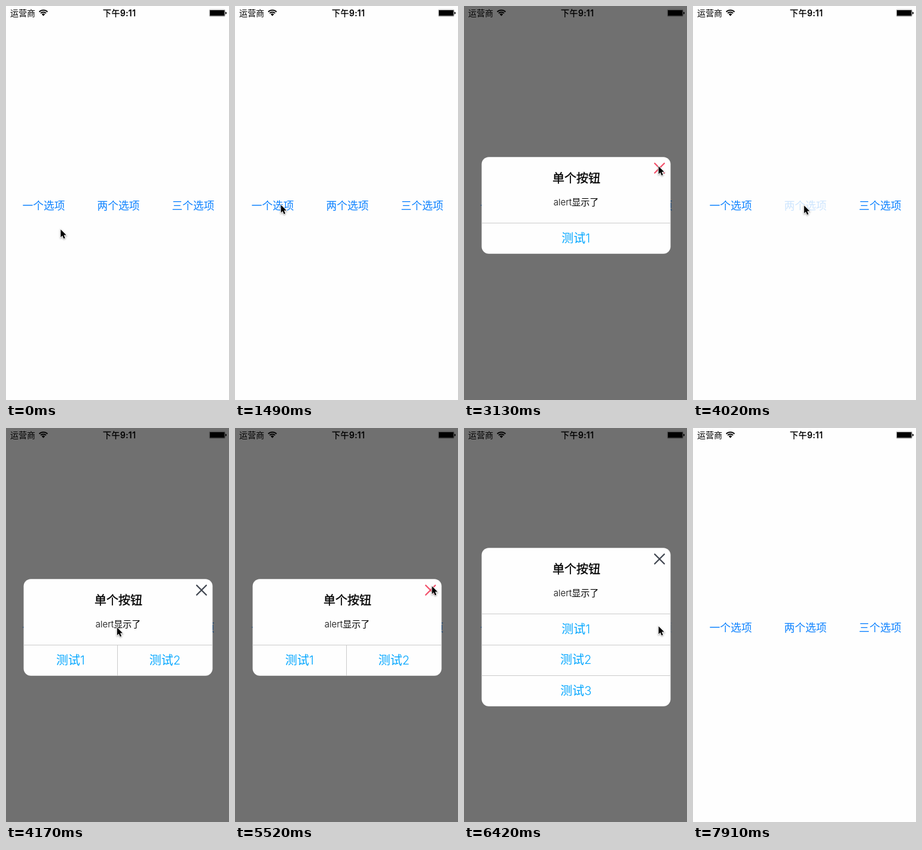
Write an HTML page with a canvas that moves like this. It is 373x658 px and loops after 8960 ms.

```html
<!DOCTYPE html>
<html lang="zh">
<head>
<meta charset="utf-8">
<style>
  html, body { margin: 0; width: 100%; height: 100%; overflow: hidden; background: #fefefe; }
  canvas { display: block; }
</style>
</head>
<body>
<canvas id="stage" width="373" height="658"></canvas>
<script>
const ctx = document.getElementById('stage').getContext('2d');
const W = 373, H = 658, LOOP = 8960;
const FONT = 'Inter, "Noto Sans CJK SC", "Noto Sans CJK", sans-serif';
const PAPER = '#fefefe', LINK = '#0a80ff', ACTION = '#00a6ff', LINE = '#cbcbcb';
const MID = 187.5;

const SHORT_TICKS = [4, 19, 24, 44];
const tickStart = i => 150 * i - 10 * SHORT_TICKS.filter(k => k <= i).length;

function tickAt(ms) {
  let i = Math.floor(ms / 150);
  while (tickStart(i + 1) <= ms) i++;
  return i;
}

// Pointer moves: first tick, last tick, end point
const HOME = [91.2, 373];
const MOVES = [
  [8, 10, [76.5, 332]],
  [12, 20, [325.2, 267.5]],
  [23, 26, [185.5, 333]],
  [30, 36, [329.2, 264]],
  [38, 41, [325.2, 331]],
  [43, 50, [338.5, 226]]
];
const POINTER_GONE = 53;

// Each visit: tap an option, see its alert, press the cross, leave.
const VISITS = [
  { tap: 11, close: 21 },
  { tap: 27, close: 37 },
  { tap: 42, close: 51 }
];

function pointerAt(tick) {
  let from = HOME;
  for (const [a, b, to] of MOVES) {
    if (tick < b) {
      const p = Math.max(0, (tick - a) / (b - a));
      const e = p * p * (3 - 2 * p);
      return from.map((v, i) => v + (to[i] - v) * e);
    }
    from = to;
  }
  return from;
}

function text(str, x, y, size, color, { weight = 350, align = 'center', bold = 0, spacing = 0 } = {}) {
  ctx.font = `${weight} ${size}px ${FONT}`;
  ctx.letterSpacing = spacing + 'px';
  ctx.textAlign = align;
  ctx.fillStyle = ctx.strokeStyle = color;
  ctx.fillText(str, x, y);
  if (bold) {
    ctx.lineWidth = bold;
    ctx.strokeText(str, x, y);
  }
}

function rect(x, y, w, h, color) {
  ctx.fillStyle = color;
  ctx.fillRect(x, y, w, h);
}

function statusBar() {
  text('运营商', 7, 17, 14, '#000', { align: 'left' });
  text('下午9:11', 189.7, 17, 14, '#000', { weight: 500, bold: 0.3, spacing: 0.45 });

  const a = -Math.PI * 0.75, b = -Math.PI * 0.25;
  ctx.fillStyle = ctx.strokeStyle = '#000';
  ctx.beginPath();
  ctx.moveTo(62.5, 16.7);
  ctx.arc(62.5, 16.7, 4, a, b);
  ctx.fill();
  ctx.lineWidth = 1.9;
  for (const r of [6.4, 9.8]) {
    ctx.beginPath();
    ctx.arc(62.5, 16.7, r, a, b);
    ctx.stroke();
  }

  ctx.lineWidth = 0.5;
  ctx.strokeStyle = 'rgba(0,0,0,0.6)';
  ctx.beginPath();
  ctx.roundRect(340.2, 6, 26.2, 11.4, 1.5);
  ctx.stroke();
  rect(341, 7, 24.6, 9.4, '#000');
  ctx.beginPath();
  ctx.arc(367, 11.7, 2, -Math.PI / 2, Math.PI / 2);
  ctx.fill();
}

function options(tapped) {
  ['一个选项', '两个选项', '三个选项'].forEach((label, i) => {
    ctx.globalAlpha = i === tapped ? 0.2 : 1;
    text(label, 63 + 125 * i, 340, 17.8, LINK);
  });
  ctx.globalAlpha = 1;
}

function cross(x, y, color) {
  ctx.strokeStyle = color;
  ctx.lineWidth = 2.3;
  ctx.lineCap = 'round';
  ctx.beginPath();
  for (const s of [-1, 1]) {
    ctx.moveTo(x - 8, y - 8 * s);
    ctx.lineTo(x + 8, y + 8 * s);
  }
  ctx.stroke();
  ctx.lineCap = 'butt';
}

function alertBox(count, pressed) {
  const top = count === 3 ? 200 : 252;
  const rows = count === 3 ? 3 : 1;
  const bottom = top + 110.3 + 51.5 * rows;
  rect(0, 0, W, H, 'rgba(0,0,0,0.555)');

  ctx.fillStyle = PAPER;
  ctx.beginPath();
  ctx.roundRect(29.5, top + 0.2, 316, bottom - top - 0.2, 12);
  ctx.fill();

  cross(327, top + 18.7, pressed ? '#f2506a' : '#404650');
  text('单个按钮', 188, top + 42.5, 20, '#000', { weight: 500, bold: 0.4 });
  text('alert显示了', MID, top + 81, 15, '#000');

  for (let r = 0; r < rows; r++) {
    rect(29.5, Math.round(top + 110.3 + 51.5 * r), 316, 1, LINE);
  }
  if (count === 2) rect(186, top + 111, 1, bottom - top - 111, LINE);
  for (let i = 0; i < count; i++) {
    const x = count === 2 ? 108 + 158 * i : MID - 0.3;
    const y = top + 142.8 + (count === 3 ? 51.5 * i : 0);
    text('测试' + (i + 1), x, y, 20, ACTION);
  }
}

function pointer([x, y]) {
  ctx.save();
  ctx.translate(x, y);
  ctx.beginPath();
  ctx.moveTo(0.3, 0.3);
  for (const [px, py] of [[0.3, 13.2], [3.2, 10.4], [5.4, 15.4], [7.6, 14.4], [5.5, 9.6], [9.6, 9.6]]) {
    ctx.lineTo(px, py);
  }
  ctx.closePath();
  ctx.shadowColor = 'rgba(0,0,0,0.4)';
  ctx.shadowBlur = 2.5;
  ctx.shadowOffsetY = 1;
  ctx.strokeStyle = '#fff';
  ctx.lineWidth = 1.8;
  ctx.stroke();
  ctx.shadowColor = 'transparent';
  ctx.fillStyle = '#000';
  ctx.fill();
  ctx.restore();
}

function draw(ms) {
  const tick = tickAt(ms % LOOP);
  rect(0, 0, W, H, PAPER);
  statusBar();
  // A tapped label stays pale for one tick after its alert opens.
  options(VISITS.findIndex(v => tick === v.tap || tick === v.tap + 1));
  const open = VISITS.findIndex(v => tick > v.tap && tick <= v.close);
  if (open >= 0) alertBox(open + 1, tick === VISITS[open].close);
  if (tick < POINTER_GONE) pointer(pointerAt(tick));
}

const began = performance.now();
function loop() {
  draw(performance.now() - began);
  requestAnimationFrame(loop);
}
loop();
</script>
</body>
</html>
```
